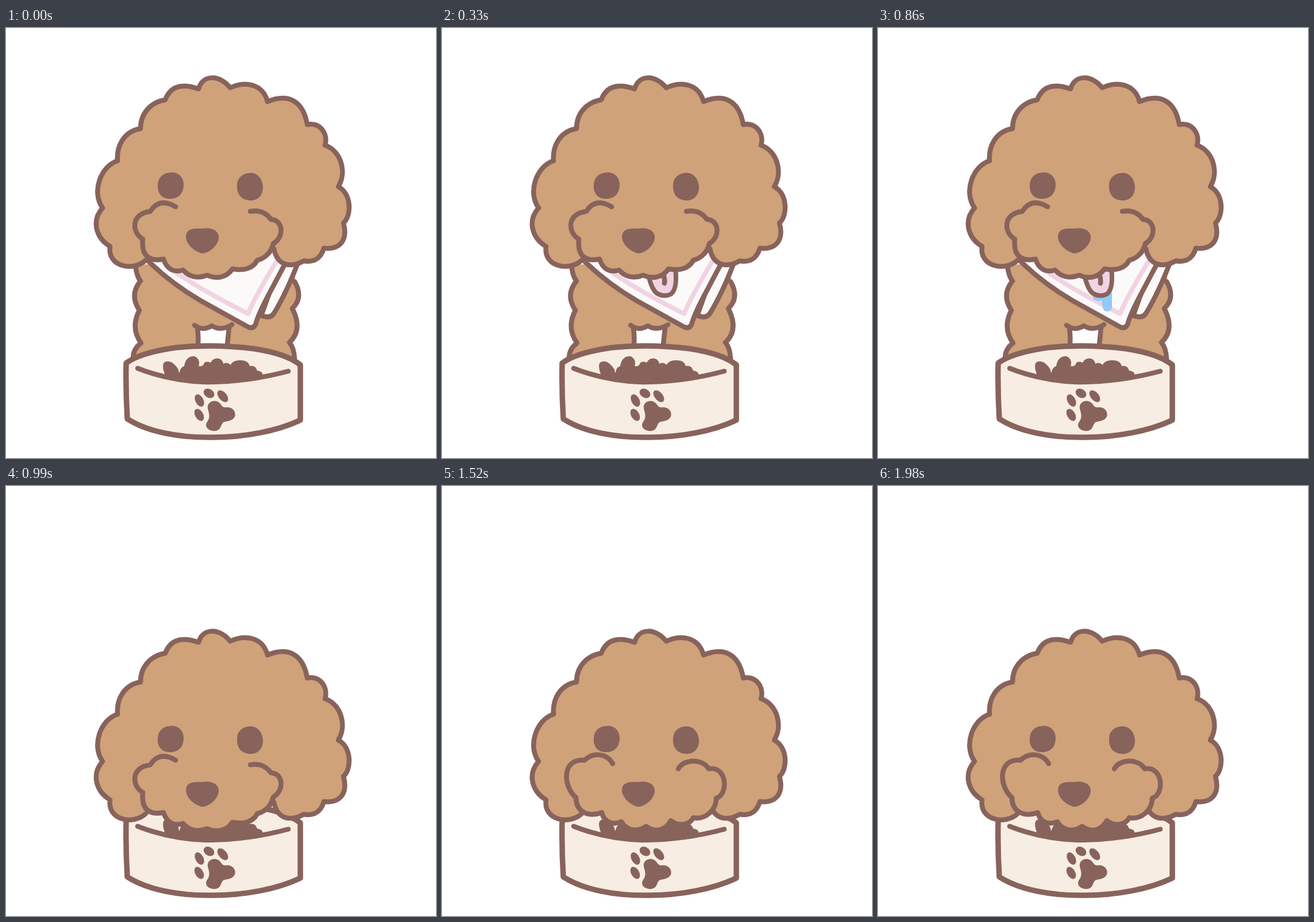
An HTML page that plays this animation: 748x748 px, repeating every 2.31 s.

```html
<!DOCTYPE html>
<html lang="en">
<head>
<meta charset="utf-8">
<title>Hungry puppy</title>
<style>
  html, body { margin: 0; width: 100%; height: 100%; overflow: hidden; background: #fff; }
  svg { display: block; width: 100%; height: 100%; }
  path { stroke-linecap: round; stroke-linejoin: round; }
  .ink { fill: #88635c; }
  .line { fill: none; stroke: #88635c; stroke-width: 8.5; }
  .fur { fill: #cfa279; }
  .cloth { fill: #fbfaf9; }
  .pink { fill: #f1d3e3; }
  .cream { fill: #f7ede2; }
  .outlined { stroke: #88635c; stroke-width: 8.5; }
</style>
</head>
<body>
<svg viewBox="0 0 748 748">
  <g id="body">
    <path class="fur" d="M225 412Q227 432 234 440Q214 464 232 491Q216 522 235 548Q221 558 221 580H334V520L328 517Q342 528 358 518Q374 528 393 516L388 521L385 580H502Q501 556 493 547Q517 525 498 488Q518 469 503 441V400Z"/>
    <path class="line" d="M225 412Q227 432 234 440Q214 464 232 491Q216 522 235 548Q221 558 221 575M502 441Q518 469 498 488Q517 525 493 547Q501 556 502 575M328 517Q342 528 358 518Q374 528 393 516M333 522Q335 535 334 550M388 521L385 550"/>
    <path class="cloth outlined" d="M480 400L444 500Q460 507 467 495Q488 460 508 408Z"/>
    <path class="cloth outlined" d="M240 398Q283 442 338 474L421 520Q430 524 434 516Q439 497 459 460L486 409L460 375Z"/>
    <path fill="none" stroke="#f1d3e3" stroke-width="8" d="M286 418Q330 451 421 497Q434 466 471 405"/>
  </g>

  <g id="bowl">
    <path class="cream outlined" style="stroke-width:9.5" d="M209 583Q233 565 295 556Q360 549 432 558Q489 567 512 586V682C473 701 415 712 360 712C300 713 245 702 211 680Q208 632 209 583Z"/>
    <path class="ink" d="M278 607Q270 588 275 582Q287 574 300 594Q301 603 302 598Q304 590 310 588Q313 570 328 571Q339 577 335 588Q343 590 345 582Q350 579 356 582Q361 573 370 575Q377 577 378 584Q384 580 391 586Q394 578 407 578Q421 577 424 588Q434 586 437 596Q447 597 447 605Q365 625 278 607Z"/>
    <path class="line" d="M229 592Q285 614 350 616Q420 616 491 597"/>
    <g class="ink">
      <ellipse cx="353" cy="635.500" rx="10" ry="7.500" transform="rotate(32 353 635.500)"/>
      <ellipse cx="377" cy="640.500" rx="12" ry="7" transform="rotate(50 377 640.500)"/>
      <ellipse cx="336.500" cy="648" rx="11.500" ry="7" transform="rotate(62 336.500 648)"/>
      <ellipse cx="336" cy="673" rx="11.500" ry="7" transform="rotate(60 336 673)"/>
      <path d="M351 662C349 652 360 646 368 650C376 654 374 660 382 660C394 658 401 668 398 676C393 685 384 683 378 686C373 690 375 700 363 701C350 701 345 692 350 685C356 677 353 670 351 662Z"/>
    </g>
  </g>

  <path id="drool" fill="#92c9f6" d="M372 462L407 460V487Q404 493 399 493Q393 493 391 487L389 474Q382 477 375 472Z"/>
  <g id="tongue">
    <path class="pink outlined" style="stroke-width:8" d="M358 424Q363 452 373 461Q386 469 398 463Q410 454 406 418Z"/>
    <path class="line" d="M385 428Q388 437 387 444"/>
  </g>

  <g id="head">
    <path class="fur outlined" d="M243 404C222 424 176 416 181 380C155 364 149 334 168 313C148 285 165 240 194 231C192 205 205 180 234 175C234 148 252 129 277 125C287 98 311 97 335 106C342 80 372 81 390 104C415 92 446 96 455 128C491 113 517 127 524 168C545 163 561 183 555 204C582 213 594 250 578 276C602 289 601 327 587 339C596 372 578 386 553 383C547 403 533 408 518 405C495 418 472 414 466 384"/>
    <path id="muzzle" class="fur outlined"/>
    <path class="ink" d="M286 251.500C300 250 309 260 309 272C309 288 300 297 286 297C272 298 263 288 264 274C264 260 273 252 286 251.500ZM424 252C438 251 447 264 447 277C447 291 438 300 426 300C411 300 402 291 402 276C401 262 410 253 424 252ZM313 364C313 351 322 348 341 349C359 346 370 353 370 364C370 378 353 392 342 392C332 391 314 379 313 364Z"/>
  </g>
</svg>
<script>
  const STEP = 330;
  const POSES = 7;
  const LOWERED = 166;
  const RELAXED = "M295 311Q267 294 251 319C216 323 219 357 238 367C235 396 249 407 274 402C280 421 294 426 308 421C319 434 335 436 350 430C365 437 383 435 394 419C414 423 430 418 437 404C446 402 461 394 465 375C485 363 482 334 461 333Q448 315 425 319";
  const CHEWING = "M297 317C286 298 262 297 248 311C209 307 209 355 233 376C233 400 253 411 278 402C282 420 298 424 312 418C323 436 342 435 355 426C371 438 389 433 398 416C413 428 432 422 437 411C458 415 477 398 477 377C499 371 496 320 464 326C452 307 420 309 411 326";

  const part = id => document.getElementById(id);
  const show = (id, visible) => part(id).setAttribute("visibility", visible ? "visible" : "hidden");

  function draw(time) {
    const pose = Math.floor(time / STEP) % POSES;
    const eating = pose >= 3;
    const chewing = eating && pose % 2 === 0;
    show("body", !eating);
    show("tongue", pose === 1 || pose === 2);
    show("drool", pose === 2);
    part("head").setAttribute("transform", `translate(0 ${eating ? LOWERED : 0})`);
    part("muzzle").setAttribute("d", chewing ? CHEWING : RELAXED);
  }

  const start = performance.now();
  function tick() {
    draw(performance.now() - start);
    requestAnimationFrame(tick);
  }
  tick();
</script>
</body>
</html>
```
